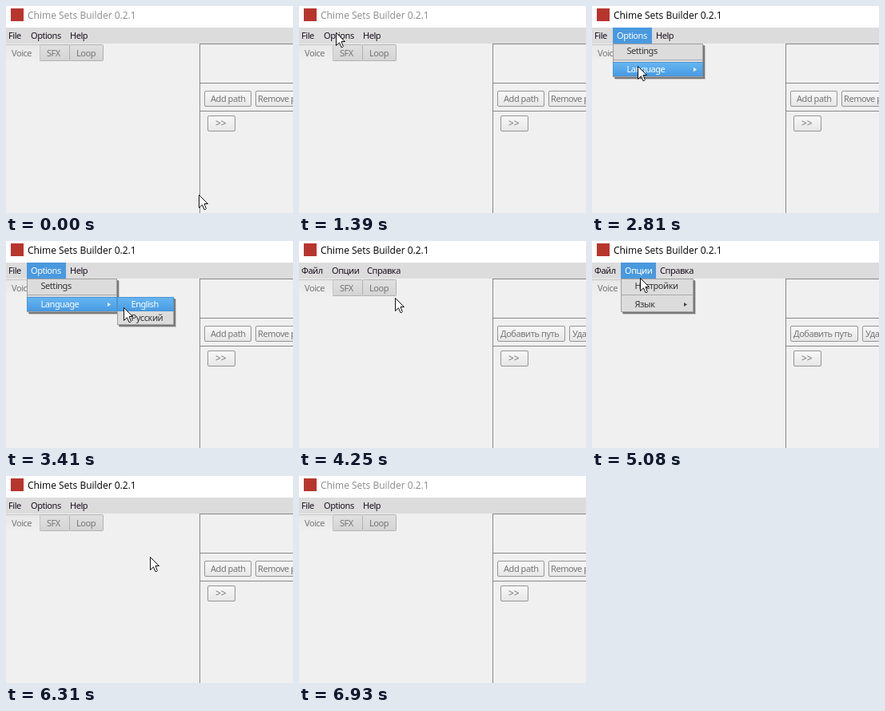
An HTML page that plays this animation: 359 by 259 pixels, repeating every 7.13 s.

```html
<!DOCTYPE html>
<html lang="en">
<head>
<meta charset="utf-8">
<title>Language menu</title>
<style>
  html, body { margin: 0; width: 100%; height: 100%; overflow: hidden; background: #f0f0f0; }
  svg { display: block; width: 359px; height: 259px; }
  text { font: 11px "Noto Sans", "DejaVu Sans", sans-serif; letter-spacing: -.45px; white-space: pre; }
  #title { font: 12px "Open Sans", "Noto Sans", sans-serif; letter-spacing: 0; }
  .line { shape-rendering: crispEdges; }
</style>
</head>
<body>
<svg viewBox="0 0 359 259" xmlns="http://www.w3.org/2000/svg">
  <defs>
    <linearGradient id="blue" x2="0" y2="1">
      <stop stop-color="#67b6f1"/><stop offset="1" stop-color="#479be4"/>
    </linearGradient>
    <linearGradient id="button" x2="0" y2="1">
      <stop stop-color="#f8f8f8"/><stop offset="1" stop-color="#e6e6e6"/>
    </linearGradient>
    <linearGradient id="tab" x2="0" y2="1">
      <stop stop-color="#e0e0e0"/><stop offset="1" stop-color="#d4d4d4"/>
    </linearGradient>
    <linearGradient id="front" x2="0" y2="1">
      <stop stop-color="#e8e8e8"/><stop offset="1" stop-color="#efefef"/>
    </linearGradient>
  </defs>
  <rect width="359" height="259" fill="#f0f0f0"/>
  <rect width="359" height="27" fill="#fff"/>
  <rect x="6" y="3" width="16" height="16" fill="#b8352d"/>
  <text id="title" x="27" y="16">Chime Sets Builder 0.2.1</text>
  <rect y="27" width="359" height="20" fill="#dcdcdc"/>
  <g id="page"></g>
  <g id="menu"></g>
  <path id="cursor" d="M.5 .5V16.5L4.5 12.8L6.9 18.5H8.5L9.3 17.6L7 11.5H11.5Z" fill="#fff" stroke="#111"/>
</svg>
<script>
const LOOP = 7130;
const CLOSED = 0, OPEN = 1, SETTINGS = 2, LANGUAGE = 3, SUBMENU = 4, FIRST = 5, SECOND = 6;
const EN = 0, RU = 1;

const words = [
  { bar: ['File', 'Options', 'Help'], barX: [3, 31, 80], menu: [26, 139], header: 49,
    items: ['Settings', 'Language'], buttons: ['Add path', 'Remove path'], buttonX: [256, 315], split: 307 },
  { bar: ['Файл', 'Опции', 'Справка'], barX: [3, 41, 85], menu: [36, 127], header: 44,
    items: ['Настройки', 'Язык'], buttons: ['Добавить путь', 'Удалить путь'], buttonX: [252, 342], split: 333 }
];

// start, cursor x, cursor y, language, menu state, window active
const steps = [
  [0, 241, 236, EN, CLOSED, 0],
  [200, 224, 218, EN, CLOSED, 0],
  [400, 184, 176, EN, CLOSED, 0],
  [600, 132, 124, EN, CLOSED, 0],
  [790, 86, 82, EN, CLOSED, 0],
  [990, 56, 57, EN, CLOSED, 0],
  [1190, 42, 47, EN, CLOSED, 0],
  [1390, 46, 33, EN, CLOSED, 0],
  [1790, 46, 33, EN, OPEN, 1],
  [2410, 49, 46, EN, OPEN, 1],
  [2610, 53, 61, EN, SETTINGS, 1],
  [2810, 57, 75, EN, LANGUAGE, 1],
  [3010, 78, 77, EN, SUBMENU, 1],
  [3210, 118, 80, EN, SUBMENU, 1],
  [3410, 147, 83, EN, FIRST, 1],
  [3630, 154, 90, EN, SECOND, 1],
  [3850, 156, 92, EN, SECOND, 1],
  [4050, 150, 89, RU, CLOSED, 1],
  [4250, 120, 71, RU, CLOSED, 1],
  [4470, 78, 45, RU, CLOSED, 1],
  [4670, 57, 35, RU, OPEN, 1],
  [4890, 60, 46, RU, OPEN, 1],
  [5090, 66, 66, RU, SETTINGS, 1],
  [5290, 84, 75, RU, LANGUAGE, 1],
  [5490, 124, 78, RU, SUBMENU, 1],
  [5690, 162, 80, RU, FIRST, 1],
  [5890, 162, 80, EN, CLOSED, 1],
  [6310, 180, 101, EN, CLOSED, 1],
  [6510, 217, 147, EN, CLOSED, 1],
  [6730, 243, 185, EN, CLOSED, 1],
  [6930, 0, 0, EN, CLOSED, 0]
];
const HIDE_AT = 6930;

const $ = id => document.getElementById(id);
const rect = (x, y, w, h, fill, more = '') =>
  `<rect x="${x}" y="${y}" width="${w}" height="${h}" fill="${fill}" ${more}/>`;
const label = (x, y, s, fill = '#757575') => `<text x="${x}" y="${y}" fill="${fill}">${s}</text>`;
const button = (x, y, w, h, s, tx) =>
  rect(x + .5, y + .5, w - 1, h - 1, 'url(#button)', 'rx="1.5" stroke="#959595"') + label(tx, y + 14, s);
const tab = (x, w, s, tx) =>
  rect(x + .5, 48.5, w, 20, 'url(#tab)', 'rx="1" stroke="#b2b2b2"') + label(tx, 63, s);

function page(lang) {
  const { bar, barX, buttons, buttonX, split } = words[lang];
  return bar.map((s, i) => label(barX[i], 41, s, '#1c1020')).join('') +
    rect(0, 48, 42, 21, 'url(#front)') + label(7, 63, 'Voice') +
    tab(42, 37, 'SFX', 51) + tab(79, 42, 'Loop', 88) +
    '<path class="line" d="M0 48.5H42.5V69" fill="none" stroke="#c4c4c4"/>' +
    '<path class="line" d="M242.5 259V47.5H359M243 96.5H359M243 131.5H359" fill="none" stroke="#888"/>' +
    button(248, 106, split - 248, 20, buttons[0], buttonX[0]) +
    button(split + 5, 106, 90, 20, buttons[1], buttonX[1]) +
    button(252, 137, 35, 20, '<tspan font-size="12" letter-spacing="0">&gt;&gt;</tspan>', 262);
}

function popup(x, y, w, h) {
  return rect(x + 3, y + 3, w, h, '#000', 'opacity=".16"') +
    rect(x + 2, y + 2, w, h, '#000', 'opacity=".4"') +
    rect(x + .5, y + .5, w - 1, h - 1, '#dcdcdc', 'stroke="#a0a0a0"');
}

function row(x, y, w, s, on) {
  return (on ? rect(x + .5, y + .5, w - 1, 17, 'url(#blue)', 'stroke="#4d94d2"') : '') +
    label(x + 17.5, y + 13, s, on ? '#fff' : '#333');
}

function menu(lang, state) {
  if (state === CLOSED) return '';
  const { bar, barX, menu: [left, right], header, items } = words[lang];
  const width = right - left, nested = state >= LANGUAGE;
  let out = rect(left, 27, header, 20, '#4999df') + label(barX[1], 41, bar[1], '#fff') +
    popup(left, 47, width, 42) +
    row(left, 47, width, items[0], state === SETTINGS) +
    rect(left + 1, 67, width - 2, 1, '#aaa') +
    row(left, 70, width, items[1], nested) +
    `<path d="M${right - 12} 77l4 2.5-4 2.5z" fill="${nested ? '#fff' : '#444'}"/>`;
  if (state >= SUBMENU) {
    out += popup(right, 70, 71, 35) +
      row(right, 70, 71, 'English', state === FIRST) +
      row(right, 87, 71, 'Русский', state === SECOND);
  }
  return out;
}

let shown = -1;
function show(i) {
  const [at, x, y, lang, state, active] = steps[i];
  $('title').setAttribute('fill', active ? '#000' : '#8a8a8a');
  $('page').innerHTML = page(lang);
  $('menu').innerHTML = menu(lang, state);
  $('cursor').setAttribute('visibility', at === HIDE_AT ? 'hidden' : 'visible');
  $('cursor').setAttribute('transform', `translate(${x} ${y})`);
  shown = i;
}

const start = performance.now();
function frame() {
  const t = (performance.now() - start) % LOOP;
  const i = steps.findLastIndex(([at]) => at <= t);
  if (i !== shown) show(i);
  requestAnimationFrame(frame);
}
frame();
</script>
</body>
</html>
```
